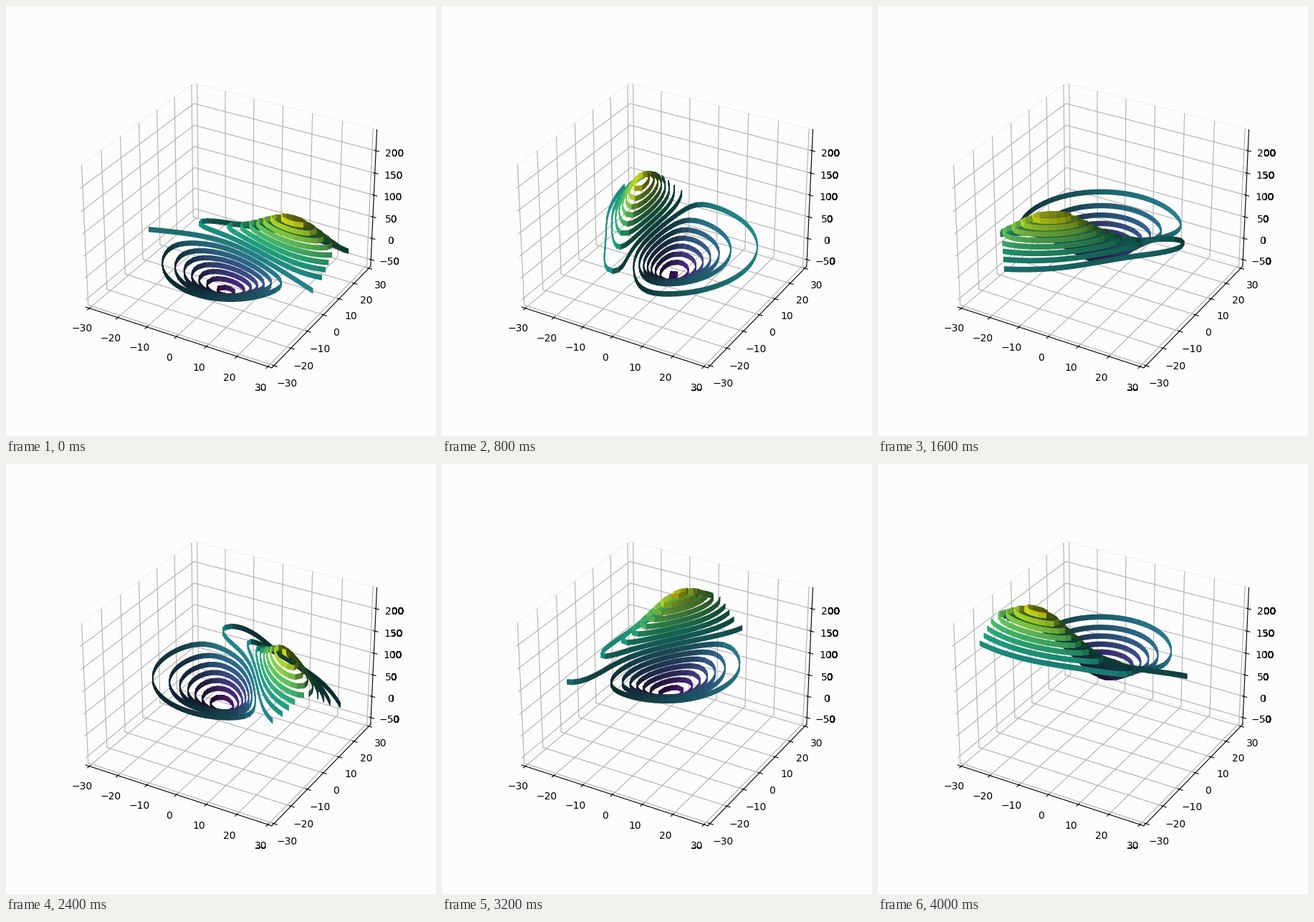
Recreate the animation shown at these times as a matplotlib script. Size 600x600 px, loop 4.2 s.

```python
import numpy as np
import matplotlib.pyplot as plt
from matplotlib.animation import FuncAnimation
from mpl_toolkits.mplot3d import axes3d

FRAMES, INTERVAL = 21, 200
MAX_LAYERS = 7
PAPER = "#fcfcfc"

plt.rcParams["axes3d.automargin"] = True
fig = plt.figure(figsize=(6, 6), dpi=100, facecolor=PAPER)


def make_axes(zorder):
    ax = fig.add_subplot(projection="3d", facecolor=PAPER)
    ax.set_zorder(zorder)
    ax.set(xlim=(-30, 30), ylim=(-30, 30), zlim=(-60, 240))
    for axis in (ax.xaxis, ax.yaxis, ax.zaxis):
        axis.set_pane_color(PAPER)
        axis.pane.set_edgecolor("#f2f2f2")
    return ax


# Stacked empty axes: labels reaching past the opaque patch grow heavier.
layers = [make_axes(k) for k in range(MAX_LAYERS)]
ax = make_axes(MAX_LAYERS)

X, Y, Z = axes3d.get_test_data(0.05)
cx, cy = X.mean(), Y.mean()
points = np.stack([X.ravel(), Y.ravel(), Z.ravel()], axis=1)
diameter = np.linalg.norm(points[Z.argmax()] - points[Z.argmin()])


def update(i):
    t = i / (FRAMES - 1)
    angle = 3 * np.pi * t
    c, s = np.cos(angle), np.sin(angle)
    x = cx + c * (X - cx) - s * (Y - cy)
    y = cy + s * (X - cx) + c * (Y - cy)

    for k, layer in enumerate(layers):
        layer.set_visible(k <= i)
    for ribbon in list(ax.collections):
        ribbon.remove()
    ax.contour(x, y, Z + diameter * t, 16, extend3d=True, cmap="viridis")
    return ax.collections


anim = FuncAnimation(fig, update, frames=FRAMES, init_func=lambda: [],
                     interval=INTERVAL, repeat=True, repeat_delay=0)
plt.show()
```
